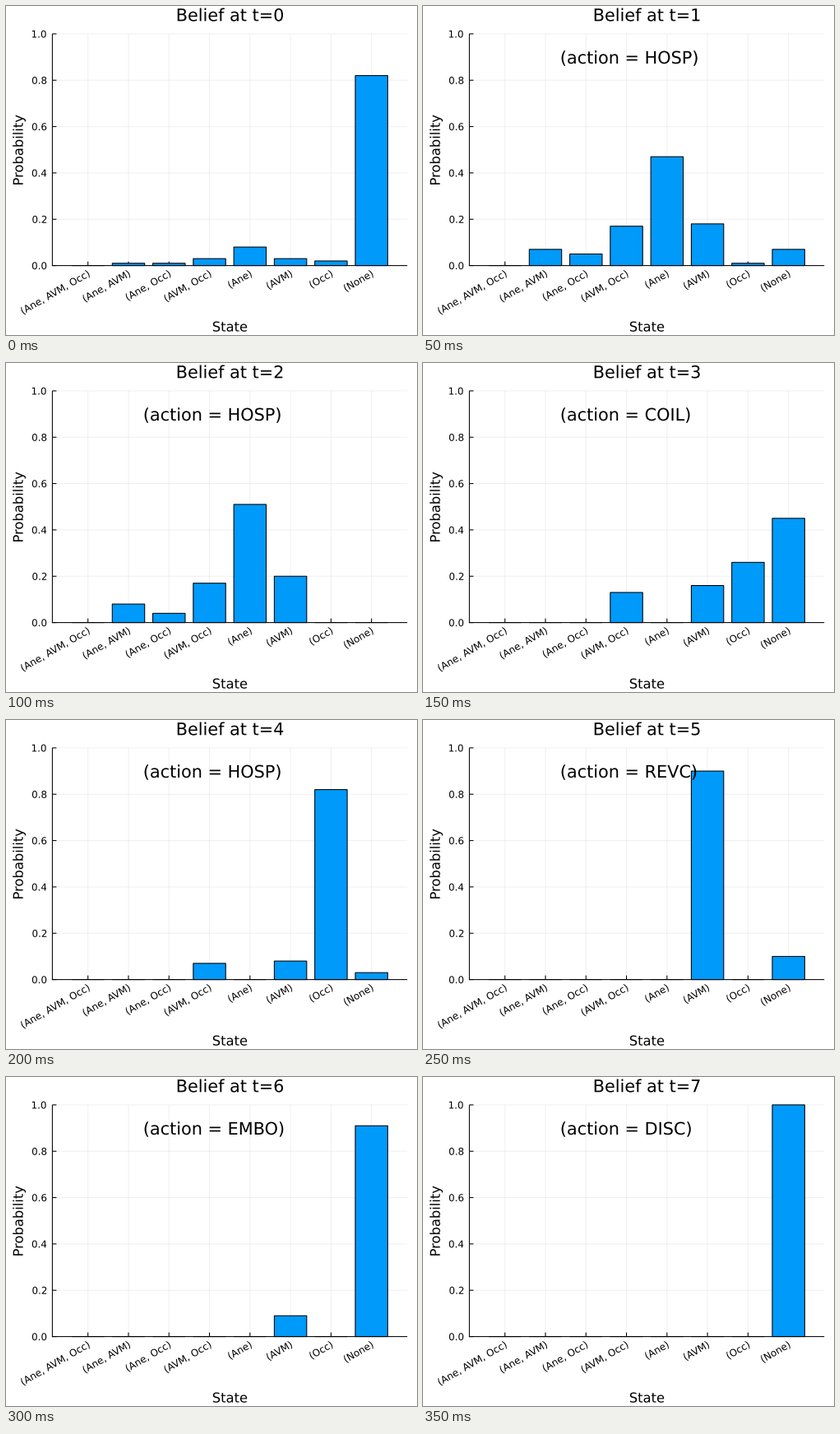
Write a matplotlib script that moves like this. It is 500 by 400 pixels and loops after 400 ms.

```python
import matplotlib.pyplot as plt
import numpy as np
from matplotlib.animation import FuncAnimation
from matplotlib.patches import PathPatch, Rectangle
from matplotlib.textpath import TextPath
from matplotlib.transforms import Affine2D

W, H, DPI = 500, 400, 100
PX = 72 / DPI
LEFT, RIGHT, TOP, BASE = 56.4, 488.2, 33.9, 315.6
STEP, FIRST = 49.28, 99.7
BAR_W = 0.8 * STEP
BIG, MID, SMALL = 20.8, 16.35, 11.9
BLUE = "#009afa"

STATES = ["Ane, AVM, Occ", "Ane, AVM", "Ane, Occ", "AVM, Occ",
          "Ane", "AVM", "Occ", "None"]
ACTIONS = ["", "HOSP", "HOSP", "COIL", "HOSP", "REVC", "EMBO", "DISC"]


def belief(**probs):
    """Probabilities by state; what is left over goes to None."""
    p = np.array([probs.get(s.replace(", ", "_"), 0) for s in STATES])
    p[-1] = 1 - p.sum()
    return p


def between(a, b):
    """Belief halfway through a two-step update: normalised geometric mean."""
    mid = np.sqrt(np.maximum(a, 1e-6) * np.maximum(b, 1e-3))
    return np.round(mid / mid.sum(), 2)


prior = belief(Ane_AVM=.01, Ane_Occ=.01, AVM_Occ=.03, Ane=.08, AVM=.03, Occ=.02)
scan = belief(Ane_AVM=.08, Ane_Occ=.04, AVM_Occ=.17, Ane=.51, AVM=.20)
coil = belief(AVM_Occ=.13, AVM=.16, Occ=.26)
rescan = belief(AVM_Occ=.07, AVM=.08, Occ=.82)
revc = belief(AVM=.90)
healthy = belief()
BELIEFS = [prior, between(prior, scan), scan, coil, rescan,
           revc, between(revc, healthy), healthy]

fig = plt.figure(figsize=(W / DPI, H / DPI), dpi=DPI, facecolor="white")
ax = fig.add_axes([0, 0, 1, 1])
ax.set_xlim(0, W)
ax.set_ylim(H, 0)
ax.axis("off")


def text_path(s, x, y, size, align=0.0, angle=0):
    """Outline of s with its baseline anchored at (x, y)."""
    path = TextPath((0, 0), s, size=size, prop={"family": "DejaVu Sans"})
    box = path.get_extents()
    place = (Affine2D().translate(-align * (box.x0 + box.x1), 0)
             .rotate_deg(angle).scale(1, -1).translate(x, y))
    return path.transformed(place)


def label(*args, **kw):
    patch = PathPatch(text_path(*args, **kw), fc="black", lw=0, zorder=5)
    return ax.add_patch(patch)


def line(x0, y0, x1, y1, alpha=1.0, z=2):
    ax.plot([x0, x1], [y0, y1], color="black", lw=1.05 * PX, alpha=alpha,
            solid_capstyle="butt", zorder=z, snap=False)


def grid(x0, y0, x1, y1):
    line(x0, y0, x1, y1, alpha=0.06, z=1)


def level(p):
    return BASE - p * (BASE - TOP)


def title_path(t):
    return text_path(f"Belief at t={t}", 206.7, 18.3, BIG)


def action_path(name):
    return text_path(f"(action = {name})", 166.8, 70, BIG)


# axes, grid and ticks
line(LEFT, TOP, LEFT, BASE + 0.5)
line(LEFT - 0.5, BASE, RIGHT, BASE)
for p in np.linspace(0, 1, 6):
    y = level(p)
    grid(LEFT, y, RIGHT, y)
    line(LEFT, y, LEFT + 5, y)
    label(f"{p:.1f}", 50, y + 4.5, SMALL, align=1)

bars = []
for i, state in enumerate(STATES):
    x = FIRST + i * STEP
    grid(x, TOP, x, BASE)
    line(x, BASE, x, BASE - 5)
    label(f"({state})", x + 3.6, 327.6, SMALL, align=1, angle=30)
    bars.append(ax.add_patch(Rectangle((x - BAR_W / 2, BASE), BAR_W, 0, fc=BLUE,
                                       ec="black", lw=1.05 * PX, zorder=3,
                                       snap=False)))

label("State", (LEFT + RIGHT) / 2 + 0.2, 395.6, MID, align=0.5)
label("Probability", 20.6, (TOP + BASE) / 2, MID, align=0.5, angle=90)
title = ax.add_patch(PathPatch(title_path(0), fc="black", lw=0, zorder=5))
note = ax.add_patch(PathPatch(action_path("HOSP"), fc="black", lw=0, zorder=5))


def draw(t):
    for bar, p in zip(bars, BELIEFS[t]):
        bar.set_height(level(p) - BASE)
    title.set_path(title_path(t))
    note.set_path(action_path(ACTIONS[t]))
    note.set_visible(bool(ACTIONS[t]))
    return [*bars, title, note]


anim = FuncAnimation(fig, draw, frames=len(BELIEFS), init_func=lambda: draw(0),
                     interval=50, repeat=True, repeat_delay=0, blit=False)
plt.show()
```
